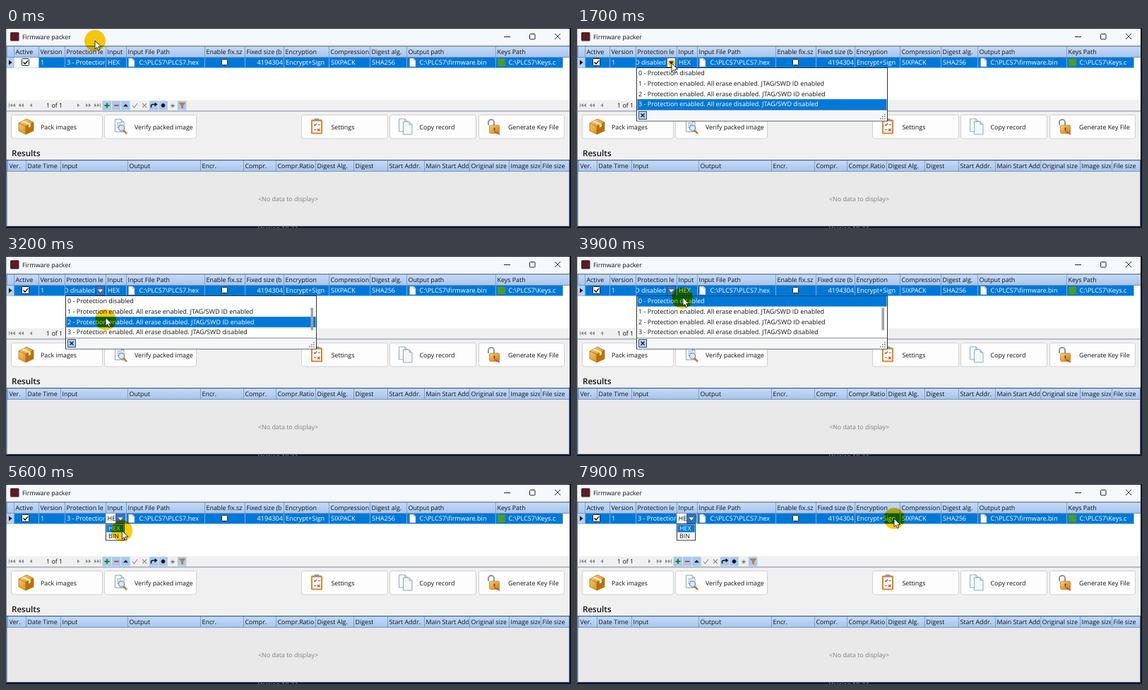
An HTML page that plays this animation: 800 px wide and 284 px high, repeating every 8000 ms.

```html
<!DOCTYPE html>
<html lang="en">
<head>
<meta charset="utf-8">
<title>Firmware packer</title>
<style>
  html, body { margin: 0; width: 100%; height: 100%; overflow: hidden; background: #10141f; }
  #stage { display: block; width: 800px; height: 284px; isolation: isolate; }
  text { font-family: "Open Sans", "Noto Sans", sans-serif; font-size: 8.9px; white-space: pre; text-rendering: geometricPrecision; }
  .data { font-size: 9.1px; }
</style>
</head>
<body>
<svg id="stage" viewBox="0 0 800 284" xmlns="http://www.w3.org/2000/svg">
  <defs>
    <linearGradient id="head" x2="0" y2="1"><stop stop-color="#c6daf5"/><stop offset="1" stop-color="#a7c5ee"/></linearGradient>
    <linearGradient id="gold" x2="1" y2="1"><stop stop-color="#ffd070"/><stop offset="1" stop-color="#c97d14"/></linearGradient>
    <g id="page">
      <path d="M.5.5H6L9 3.5V12.5H.5Z" fill="#fff" stroke="#8b98a8" stroke-width=".6"/>
      <path d="M6 .5V3.5H9" fill="#dfe6ee" stroke="#8b98a8" stroke-width=".6"/>
    </g>
    <g id="sheet">
      <path d="M.5.5H9L13 4.5V18.5H.5Z" fill="#f4f9fe" stroke="#7893ad" stroke-width=".8"/>
      <path d="M9 .5V4.5H13" fill="#cfe0f0" stroke="#7893ad" stroke-width=".8"/>
    </g>
  </defs>
  <g id="window"></g>
  <g id="activeFocus"></g>
  <g id="protection"></g>
  <g id="input"></g>
  <circle id="spot" fill="#ffcb12" style="mix-blend-mode: multiply"/>
  <path id="arrow" d="M0 0V12L2.8 9.4 4.7 13.8 6.7 12.9 4.8 8.7H8.7Z" fill="#fff" stroke="#000" stroke-width=".8"/>
</svg>
<script>
const NS = "http://www.w3.org/2000/svg";
const BLUE = "#0078d7";
const LOOP = 8000;
const $ = id => document.getElementById(id);

function add(parent, tag, attrs, content) {
  const el = document.createElementNS(NS, tag);
  for (const key in attrs) el.setAttribute(key, attrs[key]);
  if (content !== undefined) el.textContent = content;
  parent.append(el);
  return el;
}
const rect = (p, x, y, width, height, fill, more) => add(p, "rect", { x, y, width, height, fill, ...more });
const path = (p, d, fill, stroke, more) => add(p, "path", { d, fill: fill || "none", stroke: stroke || "none", ...more });
const label = (p, x, y, str, more) => add(p, "text", { x, y, fill: "#111", ...more }, str);
const group = (p, x, y) => add(p, "g", { transform: `translate(${x} ${y})` });
const page = (p, x, y, kind = "page") => add(p, "use", { href: "#" + kind, x, y });

// A nested svg clips its text at the column edge.
function cell(p, x, right, y, str, more, indent = 3) {
  const box = add(p, "svg", { x, y, width: right - x, height: 15 });
  return label(box, indent, 10.7, str, more);
}

function headerRow(p, y, columns) {
  rect(p, 1, y, 797, 15.5, "url(#head)");
  columns.forEach(([x, str], i) => {
    const right = i + 1 < columns.length ? columns[i + 1][0] : 798;
    cell(p, x, right - 1, y + .5, str, {}, 2.5);
    path(p, `M${x}.5 ${y}V${y + 15}`, null, "#6f93c4", { "stroke-width": .8 });
  });
  path(p, `M1 ${y}H798M1 ${y + 15.5}H798`, null, "#5f83b5", { "stroke-width": .8 });
}

function checkBox(p, x, y, size, checked) {
  rect(p, x, y, size, size, "#fff", { stroke: "#222", rx: 1 });
  if (checked) path(p, `M${x + 2} ${y + 5}l2.5 2.6 4-5`, null, "#111", { "stroke-width": 1.4 });
}

function button(p, x, right, textX, str) {
  rect(p, x + .5, 123.5, right - x - 1, 33.5, "#fdfdfd", { stroke: "#d0d0d0", rx: 3 });
  label(p, textX, 143.5, str);
}

function dropButton(p, x, width) {
  const face = rect(p, x, 42.5, width, 13, "#2f6fbd", { stroke: "#1c4c8c", "stroke-width": .7 });
  const mark = path(p, `M${x + width / 2 - 3.5} 47.5h7l-3.5 4Z`, "#fff");
  return hot => {
    face.setAttribute("fill", hot ? "#fff" : "#2f6fbd");
    mark.setAttribute("fill", hot ? "#111" : "#fff");
  };
}

function drawFrame(p) {
  rect(p, 0, 0, 800, 284, "#10141f");
  label(p, 357, 288, "Version 18.22", { fill: "#9a9a9a" });
  rect(p, .5, 1, 797.5, 281, "#f0f0f0");
  rect(p, .5, 1, 797.5, 24, "#f5f8fc");
  rect(p, 6, 6, 12.5, 12.5, "#5b1d26", { rx: 1.5 });
  label(p, 23, 16, "Firmware packer");
  path(p, "M705 12.5h9M777 8l8 8m0-8l-8 8", null, "#222");
  rect(p, 741.5, 8.5, 7.5, 7.5, "none", { stroke: "#222", rx: 1 });
}

function drawRecords(p) {
  const columns = [[1, ""], [11, "Active"], [46, "Version"], [83, "Protection le"], [141, "Input"],
    [170, "Input File Path"], [281, "Enable fix.sz"], [338, "Fixed size (b"], [393, "Encryption"],
    [457, "Compression"], [515, "Digest alg."], [567, "Output path"], [693, "Keys Path"]];
  const data = { fill: "#fff", class: "data" };
  rect(p, 1, 25, 797, 93, "#fff");
  rect(p, 1, 102.5, 797, 15.5, "#f0f0f0");
  headerRow(p, 26, columns);
  rect(p, 1, 42, 787.5, 14.5, BLUE);
  rect(p, 1, 42, 10, 14.5, "#b5cff1");
  path(p, "M4 45.5v7l4.5-3.5Z", "#111");
  columns.slice(1).forEach(([x]) => path(p, `M${x}.5 42V56.5`, null, "#8fbdee", { "stroke-width": .8 }));
  [[46, 83, "1"], [83, 140, "3 - Protection enabled"], [141, 170, "HEX"], [393, 457, "Encrypt+Sign"],
    [457, 515, "SIXPACK"], [515, 567, "SHA256"]].forEach(([x, right, str]) => cell(p, x, right, 41.5, str, data));
  cell(p, 170, 281, 41.5, "C:\\PLCS7\\PLCS7.hex", data, 18.5);
  cell(p, 567, 693, 41.5, "C:\\PLCS7\\firmware.bin", data, 18.5);
  cell(p, 693, 798, 41.5, "C:\\PLCS7\\Keys.c", data, 18.5);
  label(p, 392, 52.2, "4194304", { ...data, "text-anchor": "end" });
  page(p, 173, 42.5);
  page(p, 571, 42.5);
  rect(p, 696, 43.5, 11, 11, "#4a9a2c", { rx: 1 });
  checkBox(p, 22.5, 43.5, 10, true);
  checkBox(p, 305.5, 44.5, 8, false);
  path(p, "M1 25.5H798M1 118H798", null, "#5b6f8f", { "stroke-width": .8 });
}

function drawNavigator(p) {
  const chevron = (x, dir) => `M${x} 107v5.5l${3.5 * dir}-2.75Z`;
  const bar = x => `M${x} 107h1v5.5h-1Z`;
  const step = "#8a8f98";
  path(p, bar(4) + chevron(9, -1) + chevron(13, -1), step);
  path(p, chevron(21, -1) + chevron(25, -1) + chevron(37, -1), step);
  path(p, chevron(101, 1) + chevron(113, 1) + chevron(117, 1), step);
  path(p, chevron(125, 1) + chevron(129, 1) + bar(133), step);
  label(p, 57, 113, "1 of 1");
  for (let i = 0; i < 9; i++)
    if (![3, 4, 7].includes(i)) rect(p, 136.5 + i * 13.3, 103.5, 12.5, 13, "#a9c8f0");
  path(p, "M139.5 110h7M143 106.5v7", null, "#168a1c", { "stroke-width": 2 });
  path(p, "M153 110h6.5", null, "#d2491c", { "stroke-width": 2 });
  path(p, "M166 111.5l3.5-3.5 3.5 3.5Z", "#111");
  path(p, "M179 110l2.5 3 4.5-6M193 107l6 6m0-6l-6 6", null, "#8f8f8f", { "stroke-width": 1.1 });
  path(p, "M205.500 113v-2.5q0-2 2-2h4.5", null, "#111", { "stroke-width": 1.5 });
  path(p, "M210.5 105.5l4 3-4 3Z", "#111");
  const star = "m-3 0h6m-3-3v6m-2-5l4 4m0-4l-4 4";
  path(p, "M222.5 110" + star, null, "#111", { "stroke-width": 1.5 });
  path(p, "M236 110.5" + star, null, "#666", { "stroke-width": .8 });
  path(p, "M245.5 106.5h8l-3 3.5v4l-2-1.2v-2.8Z", "#e07a18", "#9c4e0c", { "stroke-width": .5 });
}

function drawButtons(p) {
  button(p, 7, 137, 49, "Pack images");
  button(p, 139, 270, 182, "Verify packed image");
  button(p, 418, 541, 460.5, "Settings");
  button(p, 543, 666, 585.5, "Copy record");
  button(p, 669, 791, 711, "Generate Key File");

  const box = group(p, 18, 129);
  path(box, "M0 6L11 0 21 5V17L10 22 0 17Z", "url(#gold)", "#a8640f", { "stroke-width": .7 });
  path(box, "M10 10.5L21 5V17L10 22Z", "#b9700f");
  path(box, "M0 6L10 10.5 21 5M10 10.5V22", null, "#a8640f", { "stroke-width": .7 });
  path(box, "M4 4l10 4.5v4l3-1.5v-4L7 2.500Z", "#ffe6a8");

  page(p, 154, 129, "sheet");
  path(p, "M157 135h7M157 138h7M157 141h5", null, "#6f95bd", { "stroke-width": .9 });
  path(p, "M166 145l5 5", null, "#c27b28", { "stroke-width": 2.5 });
  add(p, "circle", { cx: 163.5, cy: 142, r: 4.2, fill: "#cfe7fb", "fill-opacity": .9, stroke: "#60788f" });

  rect(p, 432, 130, 16, 20.5, "#d9862b", { rx: 1.5 });
  rect(p, 434, 132.5, 12, 16, "#fff");
  rect(p, 436.5, 128.5, 7, 3.5, "#8795a5", { rx: 1 });
  path(p, "M436 137l1.5 1.5 2.5-3M441 143l3.5 3.5m0-3.5l-3.5 3.5", null, "#d0442c", { "stroke-width": 1.2 });
  path(p, "M441.5 137.5h3.5M436 144.5h3.5", null, "#4c78b0", { "stroke-width": 1.2 });

  page(p, 556, 128.5, "sheet");
  page(p, 562, 132.5, "sheet");

  path(p, "M683 138v-4a4 4 0 0 1 8 0v4", null, "#8d949c", { "stroke-width": 2 });
  rect(p, 684.5, 138, 14, 11.5, "url(#gold)", { rx: 1.5, stroke: "#a8640f", "stroke-width": .6 });
  path(p, "M691.5 141.5v4", null, "#593708", { "stroke-width": 1.6 });
  path(p, "M692 147l7 4", null, "#d0442c", { "stroke-width": 1.8 });
}

function drawResults(p) {
  label(p, 8, 181.5, "Results", { style: "font-size:11.6px;font-weight:600" });
  rect(p, 1, 187, 797, 95, "#e9e9e9");
  headerRow(p, 188, [[2, "Ver."], [28, "Date Time"], [77, "Input"], [172, "Output"], [275, "Encr."],
    [336, "Compr."], [382, "Compr.Ratio"], [438, "Digest Alg."], [492, "Digest"], [540, "Start Addr."],
    [592, "Main Start Address"], [656, "Original size"], [712, "Image size"], [757, "File size"]]);
  label(p, 399.5, 245.5, "<No data to display>", { fill: "#808080", "text-anchor": "middle" });
  rect(p, 1, 187.5, 796.5, 94, "none", { stroke: "#3d5f92", "stroke-width": .9 });
}

function makeProtection(p) {
  rect(p, 84, 42, 56, 14.5, BLUE);
  const clip = add(p, "svg", { x: 84, y: 41.5, width: 42.5, height: 15 });
  label(clip, 42, 10.7, "JTAG/SWD disabled", { fill: "#fff", "text-anchor": "end" });
  const setHot = dropButton(p, 127.5, 12);
  const list = add(p, "g", {});
  rect(list, 84.5, 56.5, 355, 75.5, "#fff", { stroke: "#333" });
  const band = rect(list, 85.5, 0, 353, 15, BLUE);
  const items = ["0 - Protection disabled", "1 - Protection enabled. All erase enabled. JTAG/SWD ID enabled",
    "2 - Protection enabled. All erase disabled. JTAG/SWD ID enabled",
    "3 - Protection enabled. All erase disabled. JTAG/SWD disabled"]
    .map((str, i) => label(list, 87, 67 + 14.8 * i, str, { style: "font-size:9px" }));
  const thumb = rect(list, 431.5, 73.5, 3.5, 32, "#a0a0a0", { rx: 1 });
  rect(list, 85, 116.5, 354, 15, "#f5f7fa");
  path(list, "M85 116.5H439", null, "#777", { "stroke-width": .8 });
  rect(list, 87.5, 118.5, 11, 11, "#b3d0f3", { stroke: "#2c4f85" });
  path(list, "M90.5 121.5l5 5m0-5l-5 5", null, "#111", { "stroke-width": 1.3 });
  for (let i = 0; i < 3; i++)
    for (let j = i; j < 3; j++) rect(list, 429 + 3 * j, 128 - 3 * i, 1.5, 1.5, "#6b7685");

  return (editing, open, chosen, hovering, hot) => {
    p.style.display = editing ? "" : "none";
    list.style.display = open ? "" : "none";
    thumb.style.display = hovering ? "" : "none";
    band.setAttribute("y", 56.7 + 14.8 * chosen);
    items.forEach((el, i) => el.setAttribute("fill", i === chosen ? "#fff" : "#111"));
    setHot(hot);
  };
}

function makeInput(p) {
  rect(p, 141.5, 42, 28, 14.5, "#fff");
  cell(p, 141, 170, 41.5, "HEX", { class: "data" }, 2.5);
  const list = add(p, "g", {});
  dropButton(list, 155.5, 13);
  rect(list, 141.5, 56.5, 26, 23.5, "#fff", { stroke: "#333" });
  rect(list, 142.5, 57.5, 24, 11, BLUE);
  label(list, 145, 66, "HEX", { fill: "#fff" });
  label(list, 145, 77.3, "BIN");
  return (editing, open) => {
    p.style.display = editing ? "" : "none";
    list.style.display = open ? "" : "none";
  };
}

const win = $("window");
[drawFrame, drawRecords, drawNavigator, drawButtons, drawResults].forEach(draw => draw(win));
rect($("activeFocus"), 11.5, 42, 34.5, 14.5, "#fff");
checkBox($("activeFocus"), 22.5, 43.5, 10, true);
const showProtection = makeProtection($("protection"));
const showInput = makeInput($("input"));

// Pointer route: time, x, y.
const route = [[0, 126, 18], [500, 126, 18], [900, 117, 36], [1200, 113, 49], [1350, 114, 50], [1550, 134, 50],
  [1850, 134, 50], [2200, 138, 72], [2600, 141, 105], [2950, 142, 106], [3200, 141, 87.5], [3500, 142, 66],
  [3900, 150, 59], [4350, 163, 49], [4950, 163, 49], [5400, 164, 66], [6100, 165, 67], [6400, 182, 62],
  [6900, 267, 55], [7350, 372, 51], [7700, 446, 49], [7850, 449, 49], [8000, 449, 49]];
const clicks = [1700, 4600, 4900];

function pointer(t) {
  const i = Math.max(1, route.findIndex(key => key[0] >= t));
  const [t0, x0, y0] = route[i - 1], [t1, x1, y1] = route[i];
  const k = Math.max(0, (t - t0) / (t1 - t0));
  return [x0 + (x1 - x0) * k, y0 + (y1 - y0) * k];
}

function render(t) {
  const [x, y] = pointer(t);
  const [spotX, spotY] = pointer(Math.max(0, t - 40));
  const press = Math.max(0, ...clicks.map(c => 1 - Math.abs(t - c) / 200));
  $("arrow").setAttribute("transform", `translate(${x} ${y})`);
  for (const [key, value] of [["cx", spotX], ["cy", spotY], ["r", 15 - 10 * press]]) $("spot").setAttribute(key, value);

  const hovering = t > 1850 && y > 56.7;
  const chosen = hovering ? Math.min(3, Math.floor((y - 56.7) / 14.8)) : t < 3000 ? 3 : 0;
  $("activeFocus").style.display = t < 1300 ? "" : "none";
  showProtection(t >= 1300 && t < 4500, t >= 1600, chosen, hovering, t >= 1500 && t < 1900);
  showInput(t >= 4500, t >= 4850);
}

function tick() {
  render(performance.now() % LOOP);
  requestAnimationFrame(tick);
}
tick();
</script>
</body>
</html>
```
